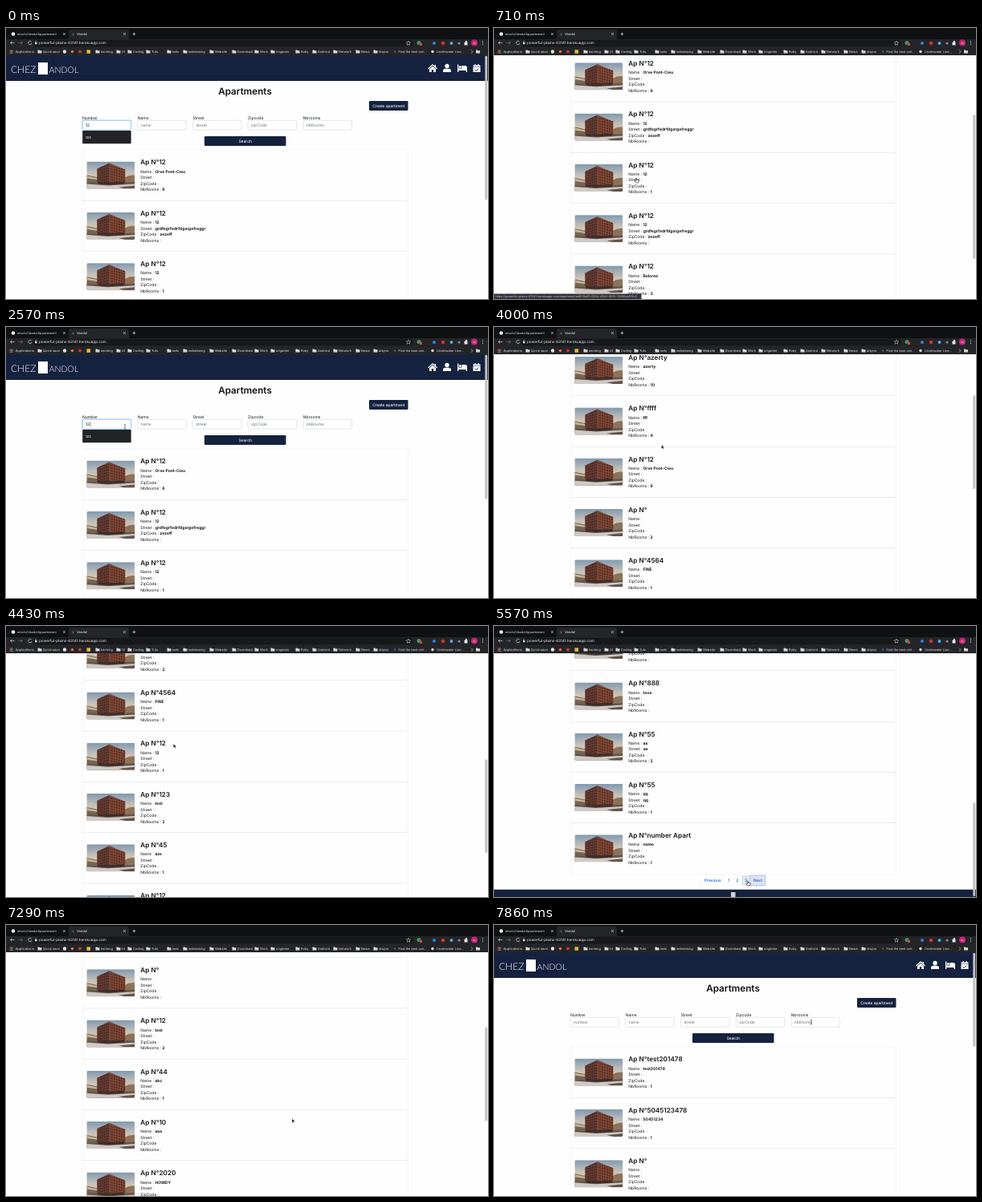
Animation, 600 px wide and 338 px high, one loop 8 s. Source, as an HTML page:

```html
<!DOCTYPE html>
<html lang="en">
<head>
<meta charset="utf-8">
<title>Apartments</title>
<style>
  html, body { margin: 0; width: 100%; height: 100%; overflow: hidden; background: #fff; }
  svg { display: block; width: 100vw; height: 100vh; font-family: Inter, "Open Sans", sans-serif; text-rendering: geometricPrecision; }
  .b { font-weight: 700; }
  .m { font-weight: 500; }
  .t { font-weight: 600; }
  .logo { font-family: Lato, sans-serif; font-weight: 300; }
</style>
</head>
<body>
<svg viewBox="0 0 600 338">
  <defs>
    <linearGradient id="sky" x2="0" y2="1">
      <stop offset="0" stop-color="#8099b0"/><stop offset=".4" stop-color="#c3c0ba"/><stop offset=".75" stop-color="#e6cfac"/>
    </linearGradient>
    <pattern id="left" width="2.6" height="3.3" patternUnits="userSpaceOnUse" patternTransform="skewY(-14)">
      <rect x=".6" y=".8" width="1.3" height="2" fill="#35292a"/>
    </pattern>
    <pattern id="right" width="3" height="3.3" patternUnits="userSpaceOnUse" patternTransform="skewY(14)">
      <rect x=".8" y=".8" width="1.5" height="2" fill="#40302d"/>
    </pattern>
    <clipPath id="round"><rect width="60" height="34" rx="1.6"/></clipPath>
    <clipPath id="view"><rect y="34" width="600" height="304"/></clipPath>
    <g id="photo" clip-path="url(#round)">
      <rect width="60" height="34" fill="url(#sky)"/>
      <path d="M0 17l15 3v8H0z" fill="#75644f"/>
      <path d="M0 18l15 3v2L0 21z" fill="#c4b49b"/>
      <path d="M47 20q6-4 13-3v11H47z" fill="#8d7258"/>
      <path d="M13 9L28 2v27l-15-1z" fill="#6b392d"/>
      <path d="M28 2l20 8v18l-20 1z" fill="#88452f"/>
      <path d="M13 9L28 2v24l-15-1z" fill="url(#left)"/>
      <path d="M28 2l20 8v15l-20 1z" fill="url(#right)"/>
      <path d="M0 26l28 1 32-1.500v8.500H0z" fill="#62554d"/>
      <path d="M14 25.500l14 .5 19-1v3l-19 1-14-1z" fill="#3d2c28"/>
      <path d="M0 28l26 2 34-2v2l-20 2 8 2H0z" fill="#cfcac6"/>
    </g>
    <g id="folder" fill="#d6d8dc"><path d="M0 0h2l.7.7H5v3.4H0z"/></g>
    <path id="arrow" d="M0 0v4.8l1.2-1 .8 1.700.8-.4-.8-1.600h1.500z" fill="#000" stroke="#fff" stroke-width=".35"/>
    <path id="hand" d="M-.6-2.6q.6-.6 1.1 0v2l2.2.5q.6.2.4 1L2.5 3H-.4L-2.2.7q0-.7.7-.5l.9.7z" fill="#fff" stroke="#111" stroke-width=".6"/>
    <path id="beam" d="M-1-2.8q1 0 1 .6 0-.6 1-.6M0-2.2v4.6M-1 3q1 0 1-.6 0 .6 1 .6" fill="none" stroke="#222" stroke-width=".6"/>
  </defs>
  <g id="page" clip-path="url(#view)"></g>
  <g id="chrome"></g>
  <g id="overlay"></g>
</svg>
<script>
const NAVY = '#15223f', INK = '#15181b';
const STEPS = 56, LOOP = 8000;
const TOP = 34, VIEW = 304, LIST = 152, ROW = 63.3;
const el = id => document.getElementById(id);

const rect = (x, y, w, h, fill, more = '') =>
  `<rect x="${x}" y="${y}" width="${w}" height="${h}" fill="${fill}" ${more}/>`;
const dot = (x, y, r, fill) => `<circle cx="${x}" cy="${y}" r="${r}" fill="${fill}"/>`;
const text = (x, y, s, size = 5, fill = INK, more = '') =>
  `<text x="${x}" y="${y}" font-size="${size}" fill="${fill}" ${more}>${s}</text>`;
const line = (d, color = '#d6d7da', w = .7) =>
  `<path d="${d}" fill="none" stroke="${color}" stroke-width="${w}"/>`;
const mid = 'text-anchor="middle"';

// Each entry: number|name|street|zip code|rooms
const lists = {
  search: ['12|Orve Pont-Cieu|||6', '12|12|grdfegrfedrfdgsrgefreggr|zezeff|', '12|12|||1',
    '12|12|grdfegrfedrfdgsrgefreggr|zezeff|', '12|Belorne|||3', '12|12|grdfegrfedrfdgsrgefreggr|zezeff|1'],
  first: ['azerty|azerty|||10', 'ffff|fff|||4', '12|Orve Pont-Cieu|||6', '||||2', '4564|FINE|||1',
    '12|12|||1', '123|test|||2', '45|aze|||1', '12|Belorne|||3', '77|abc|||2'],
  second: ['12|12|||1', '8|aaa|||2', '14|test|||1', '99|abc|||', '31|ddd|||3',
    '7|sss|||', '888|tova|||', '55|aa|aa||2', '55|qq|qq||1', 'number Apart|name|||1'],
  third: ['test201478|test201478|||1', '5045123478|50451234|||1', '||||', '12|test|||2', '44|abc|||1',
    '10|aaa|||', '2020|HOWDY|||1', 'df|ddf|||', '9f3b8da1-a340-4fa3-a8ab-2e5034bdb938|Orve 3ième|||2', '1|1|1|1|']
};

// Timelines, counted in steps of the loop
const scrollKeys = [[0, 0], [2, 0], [7, 205.5], [10, 205.5], [15, 0], [25, 0], [28, 129.5], [33, 476], [49, 476], [53, 0]];
const pointerKeys = [[2, 200, 150], [5, 177, 190], [11, 177, 190], [15, 148, 124], [20, 148, 124], [22, 270, 141],
  [24, 270, 141], [28, 208.5, 147], [33, 208.5, 147], [35, 328, 319], [37, 328, 319], [39, 316, 321],
  [42, 316, 321], [46, 330, 322], [49, 330, 322], [54, 395, 121]];
const pointerKinds = [[0, ''], [2, 'arrow'], [4, 'hand'], [12, 'arrow'], [15, 'beam'], [22, 'hand'],
  [25, 'arrow'], [34, 'hand'], [50, 'arrow'], [53, 'beam']];
const listKeys = [[0, 'search'], [24, 'first'], [35, 'second'], [41, 'third']];
const inputKeys = [[0, '12'], [20, '1'], [21, '']];

const held = (keys, k) => keys.filter(key => key[0] <= k).pop()[1];
const between = (k, a, b) => k >= a && k < b;
function tween(keys, k, column = 1) {
  const i = keys.findIndex(key => key[0] > k);
  if (i < 0) return keys[keys.length - 1][column];
  if (i === 0) return keys[0][column];
  const a = keys[i - 1], b = keys[i];
  return a[column] + (b[column] - a[column]) * (k - a[0]) / (b[0] - a[0]);
}

function drawChrome() {
  const pale = '#e2e3e6';
  let s = rect(0, 0, 600, 34, '#242528') + rect(0, 0, 600, 14, '#101113')
    + `<path d="M76 14q2 0 2-2V4q0-2 2-2h71q2 0 2 2v8q0 2 2 2z" fill="#242528"/>`;
  s += dot(9, 7.5, 2.3, '#eee') + text(14, 9, 'mivolo/VandolAppartement', 3.8, pale)
    + line('M71 6l3 3m0-3l-3 3M146 6l3 3m0-3l-3 3M159.500 5.500v4m-2-2h4')
    + dot(83.500, 8, 1.4, '#49536f') + text(88, 9, 'Vandol', 4.1, '#eee');
  s += rect(34, 14.800, 473, 8.400, '#17181b', 'rx="4.2"')
    + line('M10.500 18.500h-5m2-2l-2 2 2 2')
    + line('M15.500 18.500h5m-2-2l2 2-2 2', '#77797e')
    + line('M31.500 17a2.200 2.200 0 1 0 .5 2')
    + rect(36, 18, 2.600, 2.300, pale) + line('M36.500 18v-1.200q.8-1 1.600 0V18', pale, .5)
    + text(41, 20.200, 'powerful-plains-63141.herokuapp.com', 4.6, '#f0f0f2')
    + line('M501 16l.8 1.800 2 .2-1.500 1.300.5 2-1.800-1-1.800 1 .5-2-1.500-1.300 2-.2z', pale, .5);
  s += dot(514, 18.500, 2.500, '#3f9860') + rect(515, 19, 3, 3, '#d34343') + dot(533, 19, 2, '#3185dd')
    + dot(544, 19, 2.200, '#d63535') + dot(554.500, 19, 2, '#55a8df') + dot(564, 19, 1.600, '#85878c')
    + rect(570.500, 17.500, 4, 4, pale) + dot(573, 17, 1.200, pale)
    + dot(583, 18.500, 4, '#c22473') + text(583, 20, 'Aj', 3.5, '#fff', mid);
  for (let i = 0; i < 3; i++) s += dot(593.500, 16.500 + i * 2, .55, pale);
  for (let i = 0; i < 9; i++)
    s += rect(4.500 + i % 3 * 1.600, 27.500 + Math.floor(i / 3) * 1.600, 1.100, 1.100, ['#df5b50', '#e0b748', '#5b94e0'][i % 3]);
  s += text(11.500, 31, 'Applications', 4, pale);
  [[46, 'Quick save'], [118, 'hacking'], [144, 'UI'], [158, 'Coding'], [181, 'Tuts'], [207, 'web'], [227, 'webdesing'],
    [260, 'Website'], [288, 'Download'], [316, 'Work'], [336, 'origamie'], [367, 'Ruby'], [388, 'Android'],
    [414, 'Network'], [442, 'News'], [464, 'stayvo']].forEach(([x, label]) => {
    s += `<use href="#folder" x="${x - 6.500}" y="27.5"/>` + text(x, 31, label, 4, pale);
  });
  s += dot(73, 29.500, 2.200, '#e5e5e5') + dot(82.500, 29.500, 1.800, '#e06b45') + dot(92, 29.500, 2, '#c13b3b')
    + rect(100.500, 27.300, 4.500, 4.500, '#e6b93c')
    + dot(484, 29.500, 1.300, '#4b568d') + text(488.500, 31, 'Find the best onli...', 3.9, pale)
    + dot(531, 29.500, 1.700, '#dcdcdc') + text(536, 31, 'Underwater Line...', 3.9, pale)
    + line('M579 27.500l2 2-2 2') + `<use href="#folder" x="585" y="27.5"/>`;
  return s;
}

function drawHeader() {
  return rect(0, 34, 600, 32, NAVY)
    + text(6, 55.500, 'CHEZ', 12, '#fff', 'class="logo"') + rect(40, 43, 12, 15, '#fff')
    + text(53.500, 55.500, 'ANDOL', 10.6, '#fff', 'class="logo"')
    + `<g fill="#fff"><path d="M525 50.500l6-5.500 2.500 2.300V46h1.500v2.700l2 1.800-.8.900-5.200-4.700-5.200 4.700zM527 51.300l4-3.600 4 3.600V55h-2.800v-3h-2.400v3H527z"/>
      <circle cx="549" cy="47.500" r="2.700"/><path d="M544 55v-1.500q0-2.700 3-2.700h4q3 0 3 2.700V55z"/>
      <path d="M562 45.500h1.300v5h4V47h4.200q2.500 0 2.500 2.500V55h-1.300v-2h-9.400v2H562z"/><circle cx="565.300" cy="48.500" r="1.500"/>
      <path d="M581.500 46.500h2v-1.500h1.300v1.500h2.600v-1.500h1.300v1.500h1.800v2h-9zM581.500 49h9v6h-9z"/></g>`
    + line('M583.700 52l1.600 1.500 3-3', NAVY, 1);
}

function drawForm(value, focused, caret) {
  const button = (x, y, w, label) => rect(x, y, w, 12, NAVY, 'rx="1.2"')
    + text(x + w / 2, y + 7.700, label, 4.8, '#fff', mid + ' class="m"');
  let s = text(297.500, 83.200, 'Apartments', 11.7, '#111', mid + ' class="t"')
    + button(452, 91, 48.500, 'Create apartment') + button(247, 135, 101.500, 'Search');
  ['Number', 'Name', 'Street', 'Zipcode', 'Nbrooms'].forEach((label, i) => {
    const x = 95 + i * 68.700, active = focused && i === 0, typed = i === 0 && value;
    const hint = ['number', 'name', 'street', 'zipCode', 'nbRooms'][i];
    if (active) s += rect(x - .8, 114.500, 62, 13, '#c5dcfd', 'rx="2"');
    s += text(x, 113.500, label)
      + rect(x + .2, 115.300, 60.500, 11.800, '#fff', `rx="1.5" stroke="${active ? '#6fa8fb' : '#ced4da'}" stroke-width=".6"`)
      + text(x + 4, 123.100, typed || hint, 5, typed ? INK : '#6c757d');
  });
  if (caret) s += line(`M${99.500 + value.length * 2.700} 118.500v5.500`, '#111', .5);
  return s;
}

function drawItem(entry, i) {
  const [number, ...values] = entry.split('|');
  const y = LIST + i * ROW;
  return rect(95.200, y, 405.500, ROW, 'none', 'stroke="#000" stroke-opacity=".08" stroke-width=".45"')
    + `<use href="#photo" x="100.400" y="${y + 14.600}"/>`
    + text(167.300, y + 18.400, 'Ap N°' + number, 8.2, INK, 'class="t"')
    + ['Name', 'Street', 'ZipCode', 'NbRooms'].map((label, j) =>
      text(167.300, y + 28.700 + j * 7.500, `${label} : <tspan class="b">${values[j]}</tspan>`)).join('');
}

function drawPager(y, start, hover, nextFocused) {
  let x = 257.500;
  return [['Previous', 29.500], [start, 10.600], [start + 1, 10.600], [start + 2, 10.600], ['Next', 19]].map(([label, w], i) => {
    const lit = i === 4 && nextFocused;
    const s = rect(x, y, w, 12.500, lit ? '#dfe4ec' : i === hover ? '#e3e6ea' : '#fff',
      `stroke="${lit ? '#9dbff5' : '#eceef0'}" stroke-width="${lit ? .9 : .4}"`)
      + text(x + w / 2, y + 8.200, label, 5, '#0d5fe0', mid + ' class="m"');
    x += w;
    return s;
  }).join('');
}

function draw(k) {
  const name = held(listKeys, k), entries = lists[name], value = held(inputKeys, k);
  const paged = name !== 'search', maxScroll = paged ? 476 : 205.5;
  const scroll = tween(scrollKeys, k), bottom = TOP + VIEW + maxScroll;
  let body = drawHeader() + drawForm(value, k < 22, between(k, 17, 22)) + entries.map(drawItem).join('');
  if (paged) body += drawPager(787, name === 'third' ? 2 : 1, between(k, 38, 44) ? 3 : -1, k >= 35);
  body += rect(0, bottom - 9.300, 600, 9.300, NAVY) + rect(295, bottom - 6, 5.500, 6, '#d0d3d8');

  const ratio = VIEW / (VIEW + maxScroll);
  el('page').innerHTML = rect(0, TOP, 600, VIEW, '#fefefe')
    + `<g transform="translate(0 ${-scroll})">${body}</g>`
    + rect(596.300, TOP + scroll * ratio + .8, 2.900, VIEW * ratio - 1.600, '#c1c1c1', 'rx="1.4"');

  let over = '';
  if (k < 2 || between(k, 17, 20))
    over += rect(95.200, 128, 60.500, 16.300, '#222326', 'rx=".8"') + text(99, 137.700, '123', 4, '#fff', 'class="m"');
  if (between(k, 4, 12))
    over += rect(0, 331.500, 183.500, 6.500, '#303135')
      + text(1.500, 336.300, 'https://powerful-plains-63141.herokuapp.com/apartment/ad606a93-6224-46c0-9816-19486ce166c2', 3.7, '#c9cacd');
  const kind = held(pointerKinds, k);
  if (kind) over += `<use href="#${kind}" x="${tween(pointerKeys, k, 1)}" y="${tween(pointerKeys, k, 2)}"/>`;
  el('overlay').innerHTML = over;
}

el('chrome').innerHTML = drawChrome();
let shown = -1;
function tick() {
  // A small lead absorbs rounding at the step boundaries
  const k = Math.floor((performance.now() + 8) % LOOP / LOOP * STEPS);
  if (k !== shown) draw(shown = k);
  requestAnimationFrame(tick);
}
tick();
</script>
</body>
</html>
```
